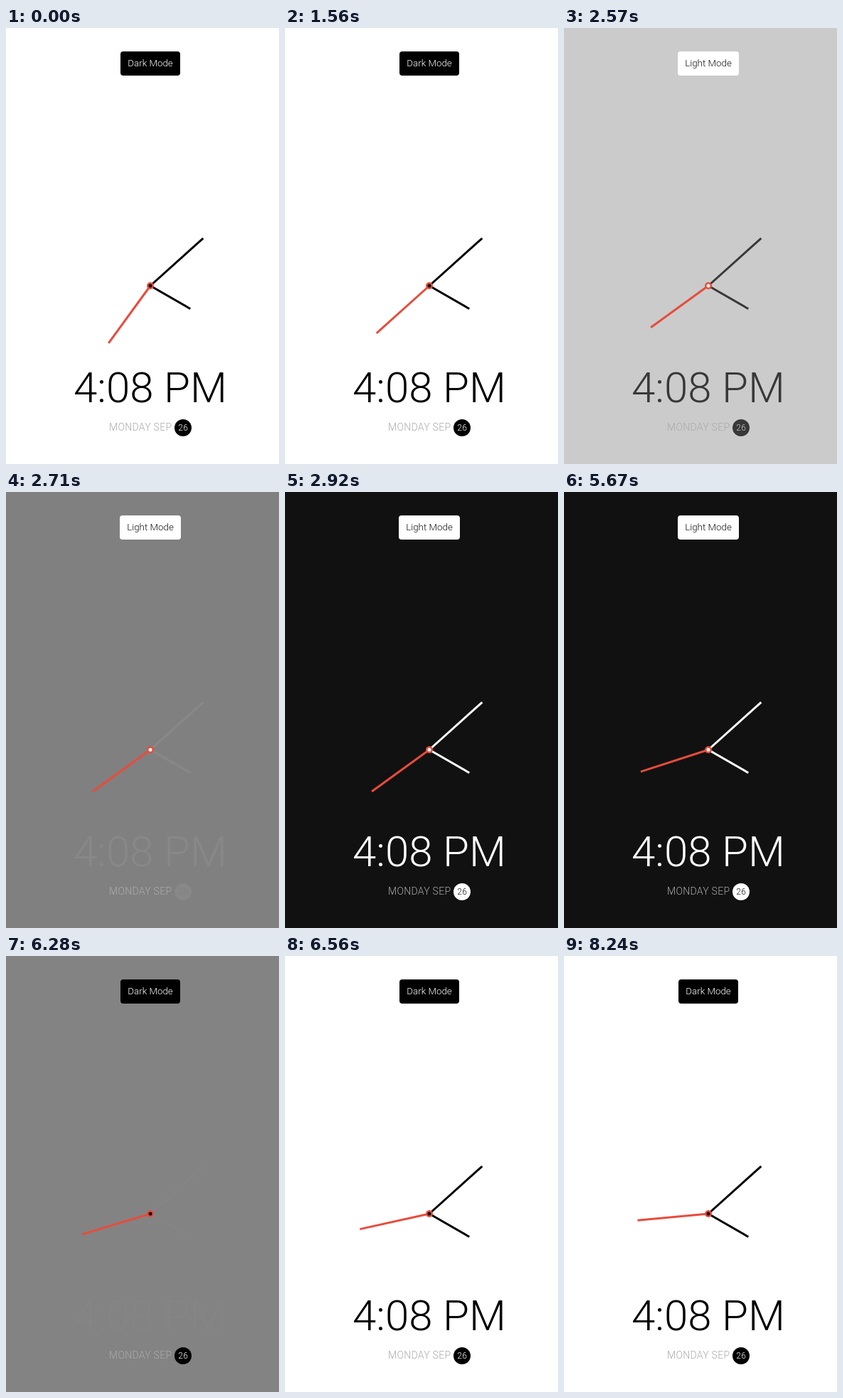
These frames come from a looping animation (384 px wide and 614 px high, 8310 ms). An HTML page:

```html
<!DOCTYPE html>
<html lang="en">
<head>
<meta charset="utf-8">
<title>Theme clock</title>
<style>
  html, body { margin: 0; height: 100%; overflow: hidden; }
  svg { display: block; width: 384px; height: 614px; }
  text { font-family: Roboto, sans-serif; font-weight: 300; text-anchor: middle; }
  .needle { stroke-width: 3; }
</style>
</head>
<body>
<svg viewBox="0 0 384 614">
  <rect id="page" width="384" height="614"/>
  <rect id="button" y="33" height="34" rx="4"/>
  <text id="label" x="203" y="54" font-size="13.33"></text>
  <g transform="translate(203 363)">
    <path class="needle ink" d="M0 0V-65" transform="rotate(120)"/>
    <path class="needle ink" d="M0 0V-100" transform="rotate(48)"/>
    <path id="second" class="needle" d="M0 0V-100" stroke="#e74c3c"/>
    <circle r="5" fill="#e74c3c"/>
    <circle id="pin" r="2.5"/>
  </g>
  <text id="time" x="203" y="526.5" font-size="60">4:08 PM</text>
  <text x="189.2" y="567" font-size="14" letter-spacing=".3" fill="#aaa">MONDAY SEP</text>
  <circle id="badge" cx="249" cy="563" r="12"/>
  <text id="day" x="249.2" y="567" font-size="12" letter-spacing=".3">26</text>
</svg>
<script>
const LOOP = 8310, FADE = 500, TICK = 1011, FIRST_TICK = 20;
const TO_DARK = 2369, TO_LIGHT = 5961;
const $ = id => document.getElementById(id);
const needles = document.querySelectorAll('.ink');

// cubic-bezier(.42, 0, 1, 1)
function easeIn(x) {
  if (x <= 0) return 0;
  if (x >= 1) return 1;
  const rise = s => s * s * (3 - 2 * s);
  let lo = 0, hi = 1;
  for (let i = 0; i < 24; i++) {
    const s = (lo + hi) / 2;
    if (1.26 * s * (1 - s) ** 2 + rise(s) < x) lo = s; else hi = s;
  }
  return rise(lo);
}

function gray(from, to, p) {
  const v = Math.round(from + (to - from) * p);
  return `rgb(${v},${v},${v})`;
}

function draw(t) {
  const dark = t >= TO_DARK && t < TO_LIGHT;
  const p = easeIn((t - TO_DARK) / FADE) - easeIn((t - TO_LIGHT) / FADE);
  const ink = gray(0, 255, p);
  const badge = dark ? p : 0; // snaps back to light without a fade

  $('page').setAttribute('fill', gray(255, 17, p));
  needles.forEach(n => n.setAttribute('stroke', ink));
  $('time').setAttribute('fill', ink);
  $('badge').setAttribute('fill', gray(0, 255, badge));
  $('day').setAttribute('fill', gray(255, 17, badge));

  const width = dark ? 86 : 84;
  $('button').setAttribute('x', 203 - width / 2);
  $('button').setAttribute('width', width);
  $('button').setAttribute('fill', dark ? '#fff' : '#000');
  $('pin').setAttribute('fill', dark ? '#fff' : '#000');
  $('label').setAttribute('fill', dark ? '#111' : '#fff');
  $('label').textContent = dark ? 'Light Mode' : 'Dark Mode';

  const ticks = Math.floor((t - FIRST_TICK) / TICK);
  const since = t - FIRST_TICK - ticks * TICK;
  const angle = 216 + 6 * (ticks + easeIn(since / FADE));
  $('second').setAttribute('transform', `rotate(${angle})`);
}

const start = performance.now();
function frame() {
  draw((performance.now() - start) % LOOP);
  requestAnimationFrame(frame);
}
frame();
</script>
</body>
</html>
```
